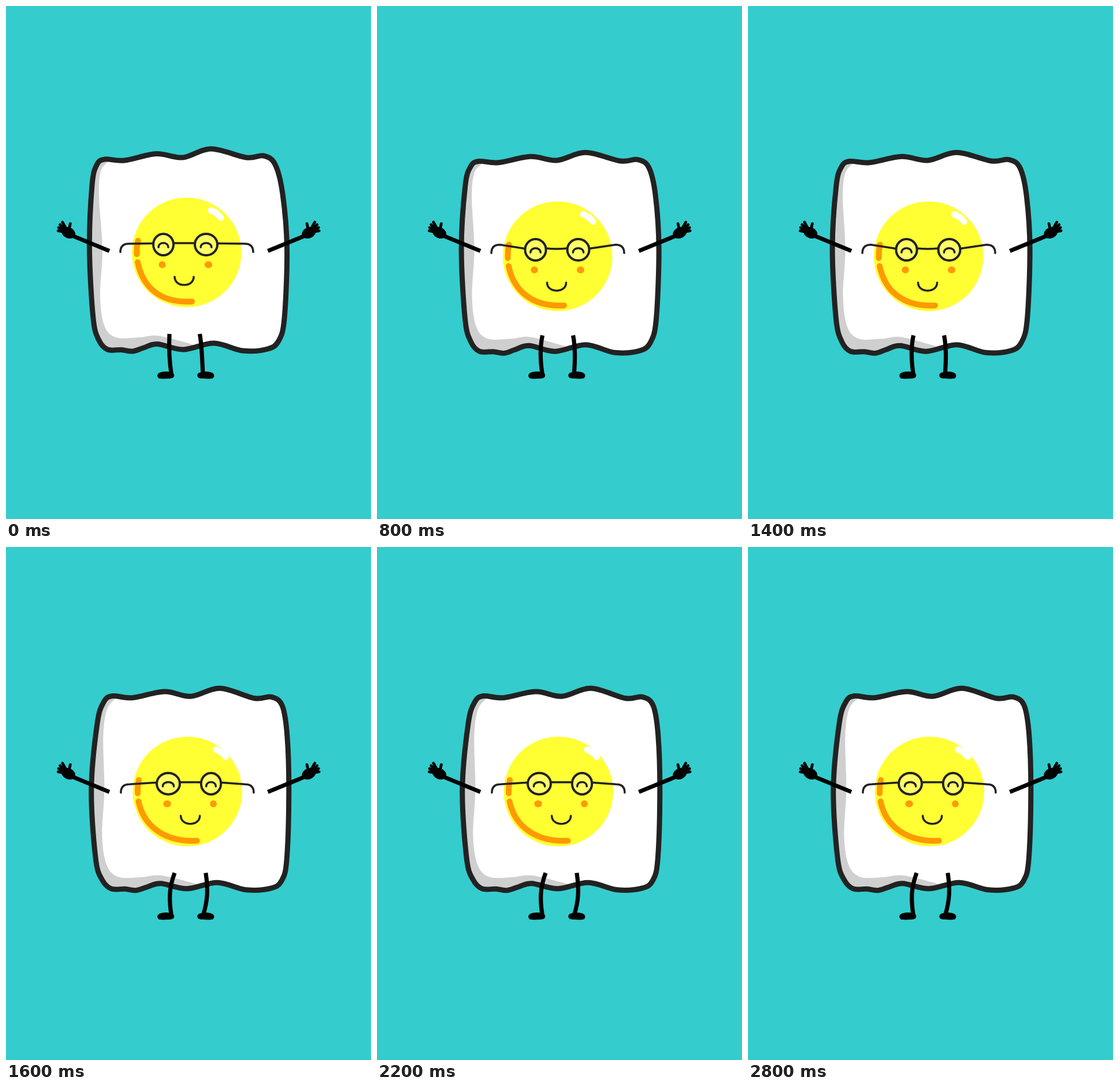
Recreate the animation shown at these times as an HTML page. Size 632 by 887 pixels, loop 3 s.

```html
<!DOCTYPE html>
<html lang="en">
<head>
<meta charset="utf-8">
<title>Dancing egg</title>
<style>
  html, body { margin: 0; width: 100%; height: 100%; overflow: hidden; background: #35cccd; }
  svg { display: block; width: 100%; height: 100%; }
  .ink { fill: none; stroke: #222; stroke-width: 3.5; stroke-linecap: round; stroke-linejoin: round; }
  .rind { stroke-width: 9; }
  .lens { fill: #fff; fill-opacity: .25; stroke-width: 4; }
  .limb { fill: none; stroke: #000; stroke-width: 7.2; }
  .finger { stroke-width: 4.8; stroke-linecap: round; }
  .amber { fill: none; stroke: #ff9900; stroke-width: 10; stroke-linecap: round; }
  .shine { stroke: #fff; stroke-width: 11; }
</style>
</head>
<body>
<svg id="stage" viewBox="0 0 632 887"></svg>
<script>
const STEP = 200;
const stage = document.getElementById('stage');

// Key points of the egg white at rest, clockwise from the top left
const EDGE = parse('171,265 205,267 260,255.5 306,262 355,247 416,262 446,259 466,274 479,325 486.5,420 482,540 472,579 453,593 410,596 360,583 307,594 262,584.5 238,591 219,597 200,594.5 176,594 161,578 151,540 144.5,420 149,310 157,275');
const SHADE = parse('178,268 164,286 161,330 167,420 163,500 170,552 190,573 230,573 262,570 312,582 335,590');
const FOOT = 'M262 640C262 633 270 632 280 632L288 634C293 636 292 643 287 643.5C282 644.5 268 645 264 643.5Z';

// Each pose: shift of the top edge (with tilt), whole body, bottom edge, yolk, face and hips
const POSES = [
  { top: [0, 0], tilt: 0, body: 0, bottom: [0, 0], yolk: [0, 0], face: [0, 0], hip: [0, 0] },
  { top: [4, 5], tilt: .01, body: 1.5, bottom: [0, 3], yolk: [0, 6.7], face: [2, 9], hip: [3.5, 2.5] },
  { top: [11, -4], tilt: .03, body: 3, bottom: [3, -3], yolk: [1.5, -3.2], face: [8.5, -3.3], hip: [9, -3.5] }
];

function parse(text) {
  return text.split(' ').map(s => s.split(',').map(Number));
}

// Smooth curve through points
function smooth(p, closed) {
  const n = p.length;
  const at = i => closed ? p[(i + n) % n] : p[Math.max(0, Math.min(n - 1, i))];
  let d = 'M' + p[0];
  for (let i = 0; i < (closed ? n : n - 1); i++) {
    const [a, b, c, e] = [at(i - 1), at(i), at(i + 1), at(i + 2)];
    const c1 = b.map((v, k) => v + (c[k] - a[k]) / 6);
    const c2 = c.map((v, k) => v - (e[k] - b[k]) / 6);
    d += `C${c1} ${c2} ${c}`;
  }
  return d + (closed ? 'Z' : '');
}

// Bend the body: the pull grows towards its top and bottom edges
function warp(pose) {
  return ([x, y]) => {
    const up = y < 450;
    const pull = ((y - 450) / (up ? 190 : 140)) ** 2;
    const [dx, dy] = up ? pose.top : pose.bottom;
    const lift = up ? pose.tilt * (x - 300) : 0;
    return [x + pose.body + dx * pull, y + (dy + lift) * pull];
  };
}

const path = (d, cls = '') => `<path d="${d}" class="${cls}"/>`;
const oval = (x, y, rx, ry, attrs = '') =>
  `<ellipse cx="${x}" cy="${y}" rx="${rx}" ry="${ry}" ${attrs}/>`;
const mirror = (art, axis) => `<g transform="matrix(-1 0 0 1 ${2 * axis} 0)">${art}</g>`;
// Symmetric arch around x; positive h bends down
const arch = (x, y, half, h) =>
  path(`M${x - half} ${y}c0 ${h} ${2 * half} ${h} ${2 * half} 0`, 'ink');

function arm() {
  const [px, py] = [108, 392];
  const finger = (deg, len) => {
    const a = deg * Math.PI / 180;
    return path(`M${px} ${py}l${len * Math.cos(a)} ${len * Math.sin(a)}`, 'limb finger');
  };
  let art = path('M179 423.5L112 396', 'limb');
  art += oval(px, py, 12.5, 9.5, `transform="rotate(25 ${px} ${py})"`);
  for (let i = 0; i < 4; i++) art += finger(191 + 16.5 * i, 18 + i);
  return art + finger(282, 16);
}

function legs([dx, dy]) {
  const [left, right, top] = [283 + dx, 335.5 + dx * 1.15, 567 + dy];
  return path(`M${left} ${top}C282 590 282 610 286.5 638`, 'limb') +
    path(`M${right} ${top}C${right + 4} 590 ${right + 4} 610 341 638`, 'limb') +
    path(FOOT) + mirror(path(FOOT), 311.3);
}

function yolk([yx, yy], [fx]) {
  return oval(312.7 + yx, 426 + yy, 94.8, 94.8, 'fill="#ffff33"') +
    path(`M${228.5 + yx} ${406 + yy}q-2.5 11 -2 23`, 'amber') +
    path(`M${228 + yx} ${443 + yy}C${237 + yx} ${487 + yy} ${268 + fx} ${514 + yy} ${322 + fx} ${511 + yy}`, 'amber') +
    path(`M${355 + fx} ${353.5 + yy}q10 3.5 17 12.5`, 'amber shine');
}

// The head turn widens one lens and narrows the other
function face([fx, fy], [yx, yy]) {
  const y = 412.5 + fy;
  const lenses = [
    { x: 272.5 + fx, rx: 17.5 + fx * .29, side: -1 },
    { x: 346.5 + fx, rx: 19.5 - fx * .27, side: 1 }
  ];
  const ear = 411 + yy * .25;
  const sag = Math.max(0, fy) * .2;
  const [a, b] = [lenses[0].x + lenses[0].rx, lenses[1].x - lenses[1].rx];
  let art = path(`M${a} ${y - 2.5}Q${(a + b) / 2} ${y - 2.5 + sag} ${b} ${y - 2.5}`, 'ink');
  for (const { x, rx, side } of lenses) {
    const tip = 313 + yx * .6 + side * 115;
    art += path(`M${tip} ${ear + 14.5}Q${tip} ${ear} ${tip - side * 15} ${ear}L${x + side * rx} ${y - 2}`, 'ink') +
      oval(x, y, rx, 18.5, 'class="ink lens"') +
      arch(x, y + 4.7, rx * .48, -10) +
      oval(x + 1 + side * 3, y + 34.8, rx * .34, 6, 'fill="#ff9a0a"');
  }
  return art + arch(308.5 + fx * 1.25, 468.3 + fy * 1.1, 16.5, 18.7);
}

function draw(pose) {
  const bend = warp(pose);
  const edge = smooth(EDGE.map(bend), true);
  const shade = smooth(SHADE.map(bend)) + 'L345 650L90 650L90 230Z';
  return `<clipPath id="white">${path(edge)}</clipPath>` +
    `<path d="${edge}" fill="#fff"/>` +
    `<path d="${shade}" fill="#cfcfcf" clip-path="url(#white)"/>` +
    path(edge, 'ink rind') +
    yolk(pose.yolk, pose.face) +
    face(pose.face, pose.yolk) +
    legs(pose.hip) +
    arm() + mirror(arm(), 316.2);
}

let shown = -1;
function render(t) {
  const now = Math.floor(t / STEP) % POSES.length;
  if (now === shown) return;
  shown = now;
  stage.innerHTML = draw(POSES[now]);
}

const start = performance.now();
function tick() {
  render(performance.now() - start);
  requestAnimationFrame(tick);
}
tick();
</script>
</body>
</html>
```
